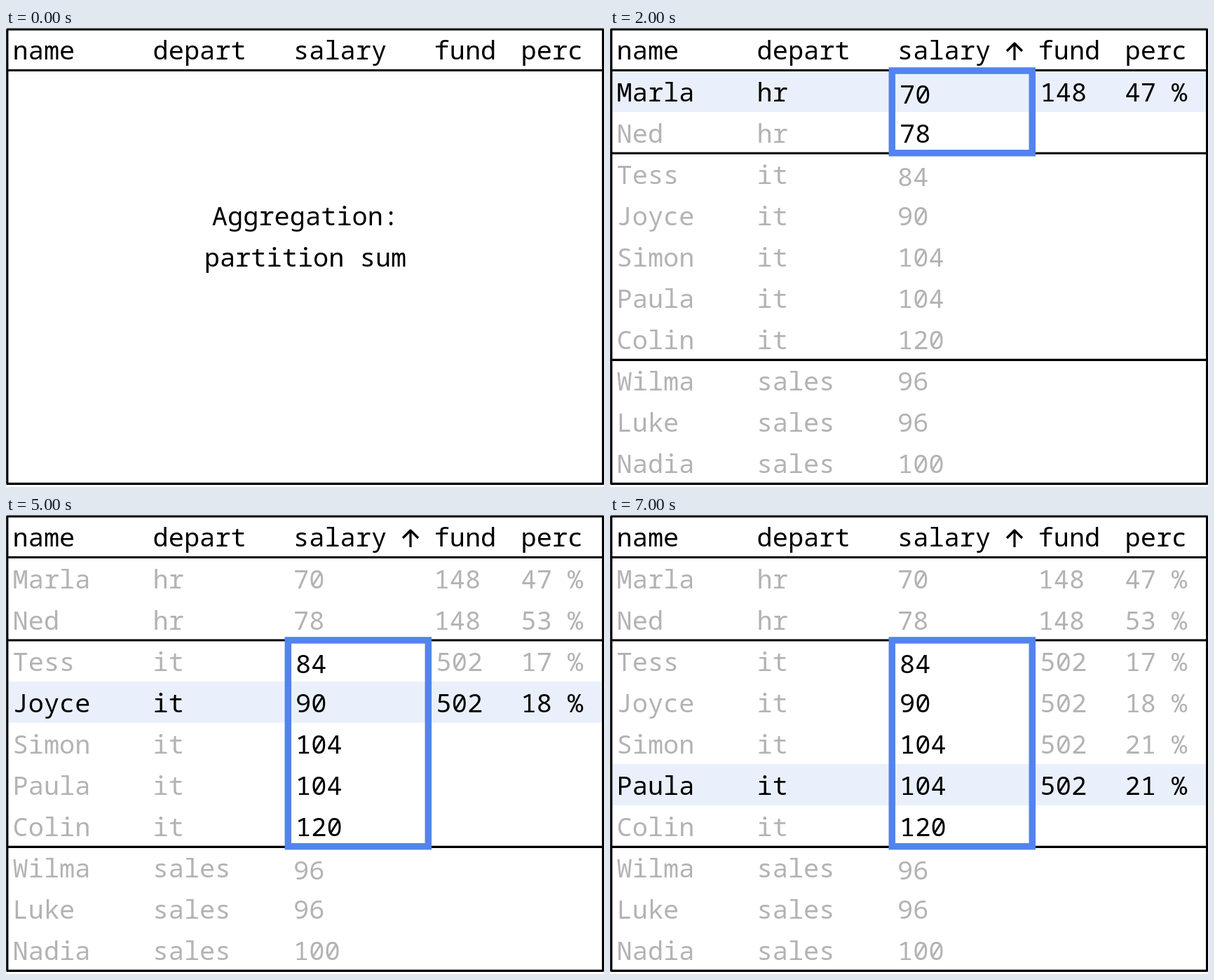
These frames come from a looping animation (853x656 px, 8 s). An HTML page:

```html
<!DOCTYPE html>
<html lang="en">
<head>
<meta charset="utf-8">
<title>Window aggregation</title>
<style>
  html, body { margin: 0; width: 100%; height: 100%; overflow: hidden; background: #fff; }
  svg { display: block; width: 853px; height: 656px; }
  text { font: 37px "Noto Sans Mono", "DejaVu Sans Mono", monospace; }
  .dim { fill: #b3b3b3; }
  .title { text-anchor: middle; }
  .rule, .arrow { fill: none; stroke: #000; stroke-width: 3.2; stroke-linejoin: round; }
  .band { fill: #eaf0fb; }
  .frame { fill: none; stroke: #5383ec; stroke-width: 9.5; }
</style>
</head>
<body>
<svg id="stage" viewBox="0 0 853 656"></svg>
<script>
const stage = document.getElementById('stage');
const STEP = 1000, STEPS = 8, ROW = 59.1;
const COL = { name: 9.5, depart: 209.5, salary: 410, fund: 610.5, perc: 734.5 };
const groups = [
  { depart: 'hr', rows: [['Marla', 70], ['Ned', 78]] },
  { depart: 'it', rows: [['Tess', 84], ['Joyce', 90], ['Simon', 104], ['Paula', 104], ['Colin', 120]] },
  { depart: 'sales', rows: [['Wilma', 96], ['Luke', 96], ['Nadia', 100]] }
];

// Flatten the groups and compute the partition sums.
const people = groups.flatMap((g, group) => {
  const fund = g.rows.reduce((sum, r) => sum + r[1], 0);
  return g.rows.map(([name, salary], i) => ({
    name, salary, fund, group, depart: g.depart, first: i === 0,
    perc: Math.round(100 * salary / fund) + ' %'
  }));
});

const edge = i => 61 + 59 * i;
const baseline = i => 45.4 + ROW * i;
const text = (x, y, str, cls = '') => `<text x="${x}" y="${y}" class="${cls}">${str}</text>`;
const rule = y => `<path class="rule" d="M2 ${y}H851.5"/>`;

function header(sorted) {
  const labels = Object.keys(COL).map(k => text(COL[k], baseline(0), k)).join('');
  return labels + (sorted ? '<path class="arrow" d="M577 46V22M566 33L577 22L588 33"/>' : '');
}

function row(p, i, current) {
  const active = current >= 0 ? people[current].group : -1;
  const inside = p.group === active;
  const tone = current < 0 || i === current ? '' : 'dim';
  const y = baseline(i + 1);
  const shift = inside ? 3 : 0;
  // The thick frame pushes down the first salary inside it and the first below it.
  const drop = active >= 0 && p.first && (inside || p.group === active + 1) ? 3 : 0;
  let out = text(COL.name, y, p.name, tone) + text(COL.depart, y, p.depart, tone)
    + text(COL.salary + shift, y + drop, p.salary, inside ? '' : tone);
  if (i <= current) out += text(COL.fund + shift, y, p.fund, tone) + text(COL.perc, y, p.perc, tone);
  return out;
}

function frame(group) {
  const start = people.findIndex(p => p.group === group);
  const top = edge(start), height = 59 * groups[group].rows.length;
  return `<rect class="frame" x="402.3" y="${top}" width="200" height="${height - 0.3}"/>`;
}

function draw(step) {
  const current = step - 2;
  let out = '';
  if (current >= 0) out += `<rect class="band" x="3" y="${edge(current)}" width="847.5" height="59"/>`;
  out += '<rect class="rule" x="1.8" y="2" width="849.8" height="649.3"/>' + rule(60.5) + header(step > 0);
  if (step === 0) {
    out += text(427, baseline(4), 'Aggregation:', 'title') + text(427, baseline(5), 'partition sum', 'title');
  } else {
    out += rule(179) + rule(474.3) + people.map((p, i) => row(p, i, current)).join('');
  }
  if (current >= 0) out += frame(people[current].group);
  stage.innerHTML = out;
}

const begin = performance.now();
let shown = -1;
function tick() {
  const step = Math.floor((performance.now() - begin) / STEP) % STEPS;
  if (step !== shown) draw(shown = step);
  requestAnimationFrame(tick);
}
tick();
</script>
</body>
</html>
```
